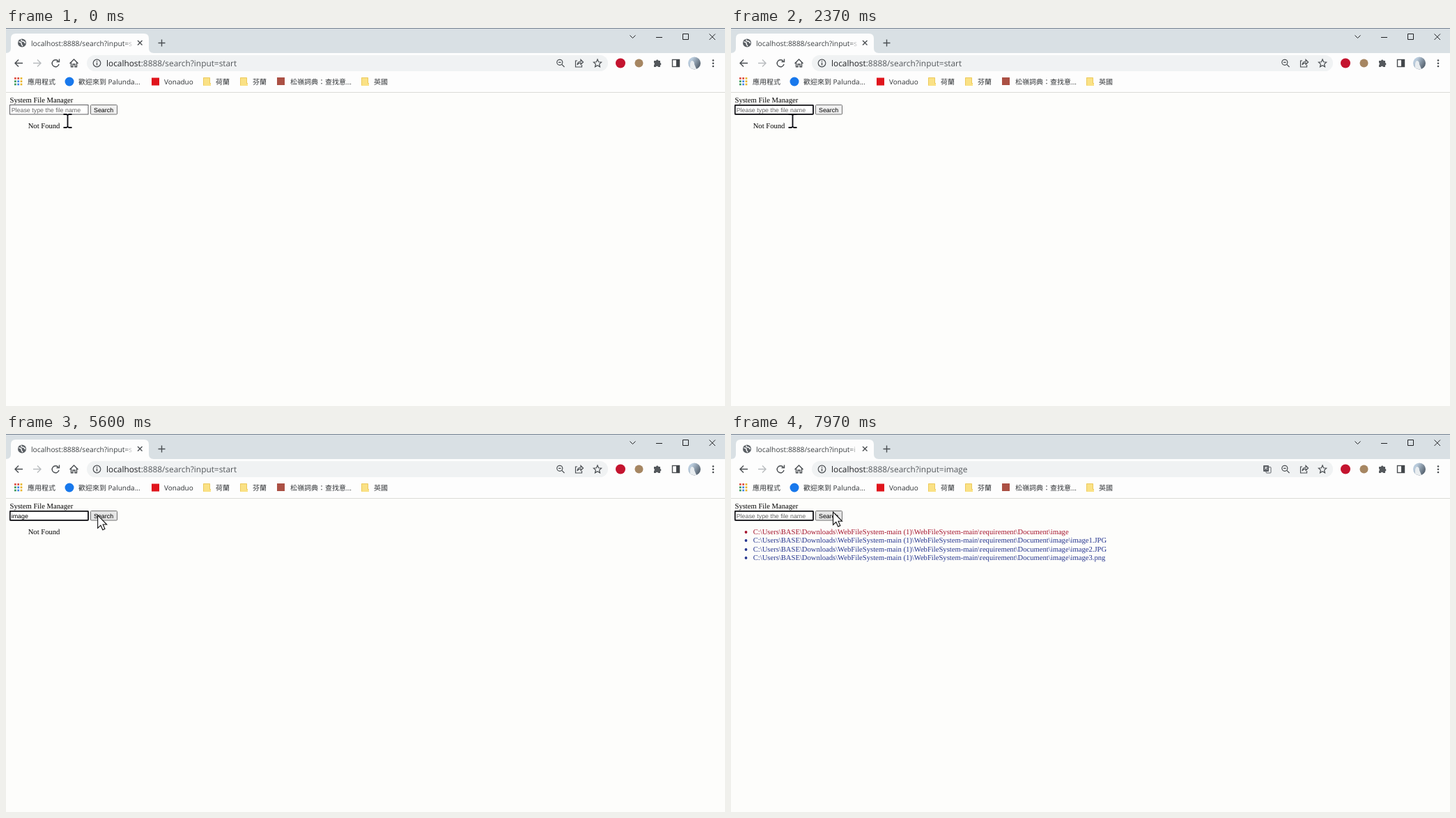
Animation, 1032 px wide and 543 px high, one loop 8000 ms. Source, as an HTML page:

```html
<!DOCTYPE html>
<html lang="zh-Hant">
<head>
<meta charset="utf-8">
<title>System File Manager</title>
<style>
html, body { margin: 0; width: 100%; height: 100%; overflow: hidden; background: #fdfdfb; }
svg { display: block; width: 1032px; height: 543px; }
text { white-space: pre; text-rendering: geometricPrecision; }
.ui { font-family: "Open Sans", "Noto Sans CJK TC", "Noto Sans CJK", sans-serif; }
.url { font-size: 11.87px; fill: #54585c; }
.tab { font-size: 10.3px; fill: #3c4043; }
.marks { font-size: 10px; fill: #303336; }
.page { font: 10.62px "Liberation Serif", serif; }
.form { font: 8.87px "Liberation Sans", "Noto Sans CJK TC", "Noto Sans CJK", sans-serif; }
.line { fill: none; stroke: #4a4e52; stroke-width: 1.4; }
.fine { fill: none; stroke: #4a4e52; stroke-width: 1.2; }
.thin { fill: none; stroke: #202124; stroke-width: 1; }
</style>
</head>
<body>
<svg viewBox="0 0 1032 543">
  <defs>
    <linearGradient id="fade">
      <stop offset="0" stop-color="#fdfdfd" stop-opacity="0"/>
      <stop offset="1" stop-color="#fdfdfd"/>
    </linearGradient>
    <linearGradient id="portrait" x2="1" y2=".6">
      <stop offset=".3" stop-color="#b9cbdc"/>
      <stop offset="1" stop-color="#56626f"/>
    </linearGradient>
    <g id="folder">
      <path d="M0 0H9Q10 0 10 1V8H11V12H1Q0 12 0 11Z" fill="#fae185"/>
      <path d="M.5 11.5V.5H9.5V8.5H11" fill="none" stroke="#ecc95c"/>
    </g>
  </defs>

  <!-- window frame and tab -->
  <rect width="1032" height="543" fill="#fdfdfb"/>
  <rect width="1032" height="36" fill="#d9e0e4"/>
  <rect width="1032" height="1" fill="#768292"/>
  <path d="M0 36Q7 36 7 29V15Q7 8 14 8H198Q205 8 205 15V29Q205 36 212 36Z" fill="#fdfdfd"/>
  <circle cx="23" cy="21.5" r="6" fill="#5a5f64"/>
  <path d="M18.5 20Q22 20 22 22T24 26M22 16.5Q21.5 19 24 19T27.5 22" fill="none" stroke="#fdfdfd" stroke-width="1.5"/>
  <text class="ui tab" x="36" y="25.5" id="tabTitle"></text>
  <rect x="170" y="12" width="13" height="20" fill="url(#fade)"/>
  <path class="line" d="M189 18L195.5 24.5M195.5 18L189 24.5"/>
  <path class="line" d="M218.5 21.5H228.5M223.5 16.5V26.5"/>
  <path class="thin" d="M895.5 10.5L899.5 14.5L903.5 10.5M933 13.5H942M971.5 8.5H979.5V16.5H971.5ZM1009.5 8.5L1018 17M1018 8.5L1009.5 17"/>

  <!-- toolbar -->
  <rect y="36" width="1032" height="56" fill="#fdfdfd"/>
  <rect x="116" y="39" width="748" height="23" rx="11.5" fill="#f0f2f3"/>
  <path class="line" d="M24 50.5H13.5M18 45.5L13 50.5L18 55.5"/>
  <path class="line" style="stroke:#b9bcbf" d="M39 50.5H49.5M45 45.5L50 50.5L45 55.5"/>
  <path class="line" d="M75 47.5A5 5 0 1 0 76 52M76.5 44.5V48.5H72.5"/>
  <path class="line" d="M91.5 51L97.5 45L103.5 51M93.5 49.5V55.8H96V52H99V55.8H101.5V49.5"/>
  <circle class="fine" cx="130.5" cy="50.5" r="5.3"/>
  <path class="line" d="M130.5 49.5V53.5M130.5 47V48.3"/>
  <text class="ui url" x="144" y="54.5"><tspan fill="#202124">localhost</tspan>:8888/search?input=<tspan id="query"></tspan></text>
  <g id="translate">
    <rect x="764" y="45" width="8" height="9" rx="1" fill="#5f6368"/>
    <rect class="thin" x="768" y="47.5" width="7" height="8.5" rx="1" style="stroke:#5f6368"/>
    <path d="M766 48H770M768 47V48L766 51M767 49L770 51" fill="none" stroke="#fff" stroke-width=".8"/>
  </g>
  <g class="fine">
    <circle cx="794.8" cy="49.3" r="4"/>
    <path d="M797.8 52.3L801.5 56M793 49.3H796.6"/>
    <path d="M820 47H817.5V56H826.5V53M820 53Q820.5 48 825 48V45.5L828.5 49L825 52.3V50Q821.5 50 820 53Z"/>
    <path d="M849 45L850.6 48.8L854.6 49.2L851.6 51.9L852.5 55.8L849 53.7L845.5 55.8L846.4 51.9L843.4 49.2L847.4 48.8Z"/>
  </g>
  <circle cx="882" cy="50.5" r="7" fill="#c4142f"/>
  <circle cx="908.5" cy="50.5" r="6" fill="#a68662"/>
  <path d="M930 47H933A1.8 1.8 0 0 1 936.5 47H939V50A1.8 1.8 0 0 1 939 53.5V56H936A1.7 1.7 0 0 0 932.8 56H930V53A1.7 1.7 0 0 0 930 50Z" fill="#54585c"/>
  <rect class="line" x="956.5" y="45.5" width="10" height="10"/>
  <rect x="962" y="45" width="5" height="11" fill="#43474b"/>
  <circle cx="988" cy="50.5" r="9" fill="url(#portrait)"/>
  <path d="M982 57Q981 50 984 47Q988 47 988 52L991 59Q986 60 982 57Z" fill="#e9edf0"/>
  <g fill="#4a4e52">
    <circle cx="1015" cy="46.5" r="1.3"/><circle cx="1015" cy="50.7" r="1.3"/><circle cx="1015" cy="55" r="1.3"/>
  </g>

  <!-- bookmarks -->
  <g id="apps"></g>
  <circle cx="91" cy="77" r="6.5" fill="#1878ec"/>
  <rect x="209" y="71.5" width="11" height="11" fill="#e0141c"/>
  <rect x="389" y="71" width="11" height="11" fill="#ab5044"/>
  <use href="#folder" x="283" y="71"/><use href="#folder" x="336" y="71"/><use href="#folder" x="510" y="71"/>
  <g class="ui marks">
    <text x="31" y="81">應用程式</text>
    <text x="104" y="81">歡迎來到 Palunda...</text>
    <text x="227" y="81">Vonaduo</text>
    <text x="301" y="81">荷蘭</text>
    <text x="354" y="81">芬蘭</text>
    <text x="408" y="81">松嶺詞典：查找意...</text>
    <text x="528" y="81">英國</text>
  </g>
  <rect y="92" width="1032" height="1" fill="#dcdcd8"/>

  <!-- page -->
  <text class="page" x="5.5" y="107">System File Manager</text>
  <rect x="5.5" y="110.5" width="112.5" height="13.5" fill="#fff" stroke="#5c5c60"/>
  <rect id="focusRing" x="5.8" y="110.8" width="112.2" height="13" rx="1" fill="none" stroke="#101014" stroke-width="1.7"/>
  <text class="form" x="7.7" y="121" fill="#666" id="placeholder">Please type the file name</text>
  <text class="form" x="7.7" y="121" id="typed"></text>
  <path id="composing" stroke="#333" stroke-width=".8" stroke-dasharray="1 1"/>
  <rect id="caret" y="112.5" width="1" height="10"/>
  <rect id="button" x="121.5" y="110.5" width="38" height="13.5" rx="1" stroke="#707070"/>
  <text class="form" x="126" y="121">Search</text>
  <text class="page" x="31.7" y="144" id="notFound">Not Found</text>
  <g class="page" id="results"></g>

  <!-- pointer -->
  <g id="ibeam" fill="none" stroke="#0c0c14" stroke-width="1.8">
    <path d="M0 -9V9M-6 9.5H-2L0 8.5L2 9.5H6"/>
    <path id="ibeamTop" d="M-6 -9.5H-2L0 -8.5L2 -9.5H6"/>
  </g>
  <path id="arrow" d="M.5 0V18.5L4.8 14.5L7.7 21L10.8 19.6L8 13.3H13.5Z" fill="#fff" stroke="#111" stroke-width="1.1"/>
</svg>
<script>
const LOOP = 8000, LOADED = 5880, LEAVE = 5150, FIRST_KEY = 3250;
const el = id => document.getElementById(id);
const show = (id, on) => el(id).setAttribute('visibility', on ? 'visible' : 'hidden');

const folder = String.raw`C:\Users\BASE\Downloads\WebFileSystem-main (1)\WebFileSystem-main\requirement\Document\image`;
el('results').innerHTML = ['', '\\image1.JPG', '\\image2.JPG', '\\image3.png'].map((file, i) => {
  const y = Math.round(144 + i * 12.45);
  return `<g fill="${i ? '#26368f' : '#a5142c'}"><circle cx="21.5" cy="${y - 3}" r="1.9"/><text x="31.7" y="${y}">${folder + file}</text></g>`;
}).join('');

const dots = ['#dd4b3e', '#dd4b3e', '#e9b62f', '#3b9a57', '#4285e8', '#e9b62f', '#3b9a57', '#4285e8', '#e9b62f'];
el('apps').innerHTML = dots.map((color, i) =>
  `<rect x="${12 + i % 3 * 4.3}" y="${71 + Math.floor(i / 3) * 4.3}" width="2.7" height="2.7" fill="${color}"/>`).join('');

// [time, text in the field]
const typing = [
  [0, ''], [FIRST_KEY, 'ㄛ'], [3420, 'ㄩㄛ'], [3860, 'ㄛ'], [3980, ''],
  [4250, 'i'], [4420, 'im'], [4580, 'ima'], [4740, 'imag'], [4920, 'image'], [LOADED, '']
];
// [time, x, y]
const path = [
  [0, 88.5, 133.5], [LEAVE, 88.5, 133.5], [5350, 108, 138], [5650, 133, 115],
  [6700, 133, 115], [7050, 90, 117], [7300, 90, 117], [7650, 146, 112], [LOOP, 146, 112]
];

const latest = (list, t) => list.filter(step => step[0] <= t).pop();

function pointerAt(t) {
  const i = path.findIndex(p => p[0] > t);
  const [t0, x0, y0] = path[i - 1], [t1, x1, y1] = path[i];
  const u = (t - t0) / (t1 - t0), k = u * u * (3 - 2 * u);
  return [x0 + (x1 - x0) * k, y0 + (y1 - y0) * k];
}

function draw(t) {
  const loaded = t >= LOADED;
  const word = loaded ? 'image' : 'start';
  el('query').textContent = word;
  el('tabTitle').textContent = 'localhost:8888/search?input=' + word[0];
  show('translate', loaded);
  show('results', loaded);
  show('notFound', !loaded);

  const [typedAt, text] = latest(typing, t);
  const focusAt = loaded ? 7250 : 1800;
  const focused = t >= focusAt;
  const typed = el('typed');
  typed.textContent = text;
  const textWidth = text ? typed.getComputedTextLength() : 0;
  show('placeholder', !text);
  show('composing', text.endsWith('ㄛ'));
  el('composing').setAttribute('d', `M8 122.5h${textWidth}`);
  show('focusRing', focused);
  show('caret', focused && (t - Math.max(focusAt, typedAt)) % 1000 < 500);
  el('caret').setAttribute('x', 7.7 + textWidth);

  const [x, y] = pointerAt(t);
  const inRow = y > 110 && y < 124;
  const overButton = inRow && x > 121 && x < 160;
  const overText = t < LEAVE || (inRow && x < 119);
  el('button').setAttribute('fill', overButton ? '#e5e5e5' : '#efefef');
  show('ibeam', overText);
  show('ibeamTop', overText && (t < FIRST_KEY || t >= LEAVE));
  show('arrow', !overText);
  for (const id of ['ibeam', 'arrow']) el(id).setAttribute('transform', `translate(${x} ${y})`);
}

let start;
function tick(now) {
  start ??= now;
  draw((now - start) % LOOP);
  requestAnimationFrame(tick);
}
draw(0);
requestAnimationFrame(tick);
</script>
</body>
</html>
```
